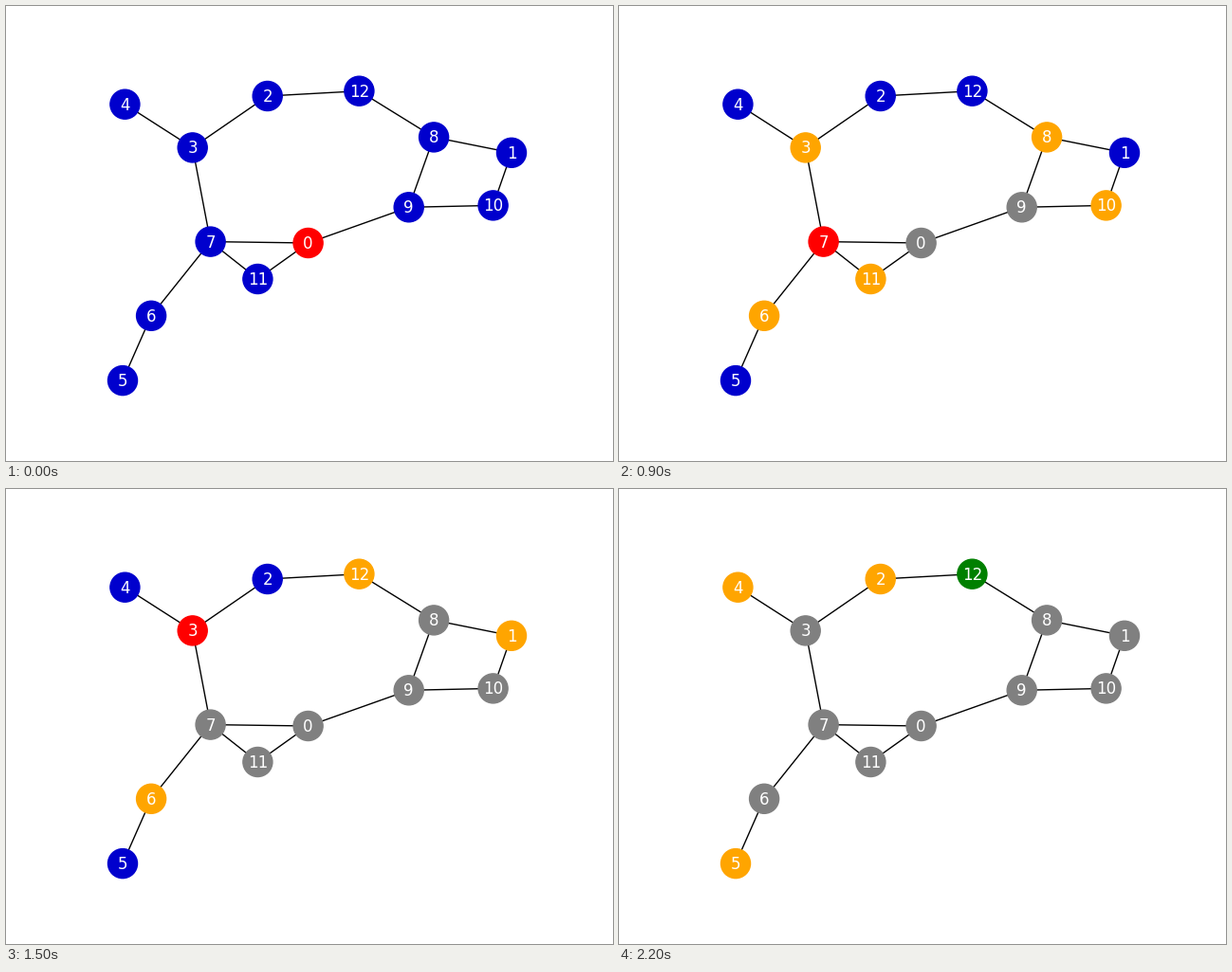
A matplotlib script for the animation above (2300 ms loop, 640 px wide and 480 px high).

```python
import matplotlib.pyplot as plt
from matplotlib.animation import FuncAnimation

W, H, DPI = 640, 480, 100
START, GOAL = 0, 12
LABEL_DROP = 1  # optical centring of the digits, in pixels

NEW, QUEUED, CURRENT, DONE, FOUND = "mediumblue", "orange", "red", "gray", "green"

# Node centres in pixels, y pointing down
POS = [
    (318.6, 250), (533, 154.8), (275.7, 95), (196.7, 149.4), (125.4, 103.7),
    (123, 395.1), (153.1, 326.8), (215.6, 248.6), (451.1, 138.4),
    (424.7, 212.3), (513.6, 210.4), (265.4, 288), (372.4, 89.7),
]
# Edges join consecutive nodes of each walk
WALKS = [(1, 8, 9, 0, 7, 3, 2, 12, 8), (1, 10, 9), (3, 4), (7, 6, 5), (7, 11, 0)]


def build_graph():
    graph = {node: [] for node in range(len(POS))}
    for walk in WALKS:
        for a, b in zip(walk, walk[1:]):
            graph[a].append(b)
            graph[b].append(a)
    return graph


def search(graph):
    """Breadth-first search, yielding the node colours after each step."""
    colors = [NEW] * len(POS)
    queue = [START]
    while queue:
        node = queue.pop(0)
        colors[node] = CURRENT
        yield colors[:]
        if node == GOAL:
            colors[node] = FOUND
            yield colors[:]
            return
        for other in graph[node]:
            if colors[other] == NEW:
                colors[other] = QUEUED
                queue.append(other)
                yield colors[:]
        colors[node] = DONE


steps = list(search(build_graph()))

fig = plt.figure(figsize=(W / DPI, H / DPI), dpi=DPI, facecolor="white")
ax = fig.add_axes([0, 0, 1, 1])
ax.axis("off")

for walk in WALKS:
    for a, b in zip(walk, walk[1:]):
        ax.plot(*zip(POS[a], POS[b]), color="black", lw=1, zorder=1)
nodes = ax.scatter(*zip(*POS), s=500, c=steps[0], linewidths=1, zorder=2)
for i, (x, y) in enumerate(POS):
    ax.text(x, y + LABEL_DROP, str(i), color="white", size=12,
            family="DejaVu Sans", ha="center", va="center", zorder=3)
ax.set(xlim=(0, W), ylim=(H, 0))


def update(i):
    nodes.set_color(steps[i])
    return [nodes]


anim = FuncAnimation(fig, update, frames=len(steps), interval=100,
                     repeat=True, repeat_delay=0)
plt.show()
```
